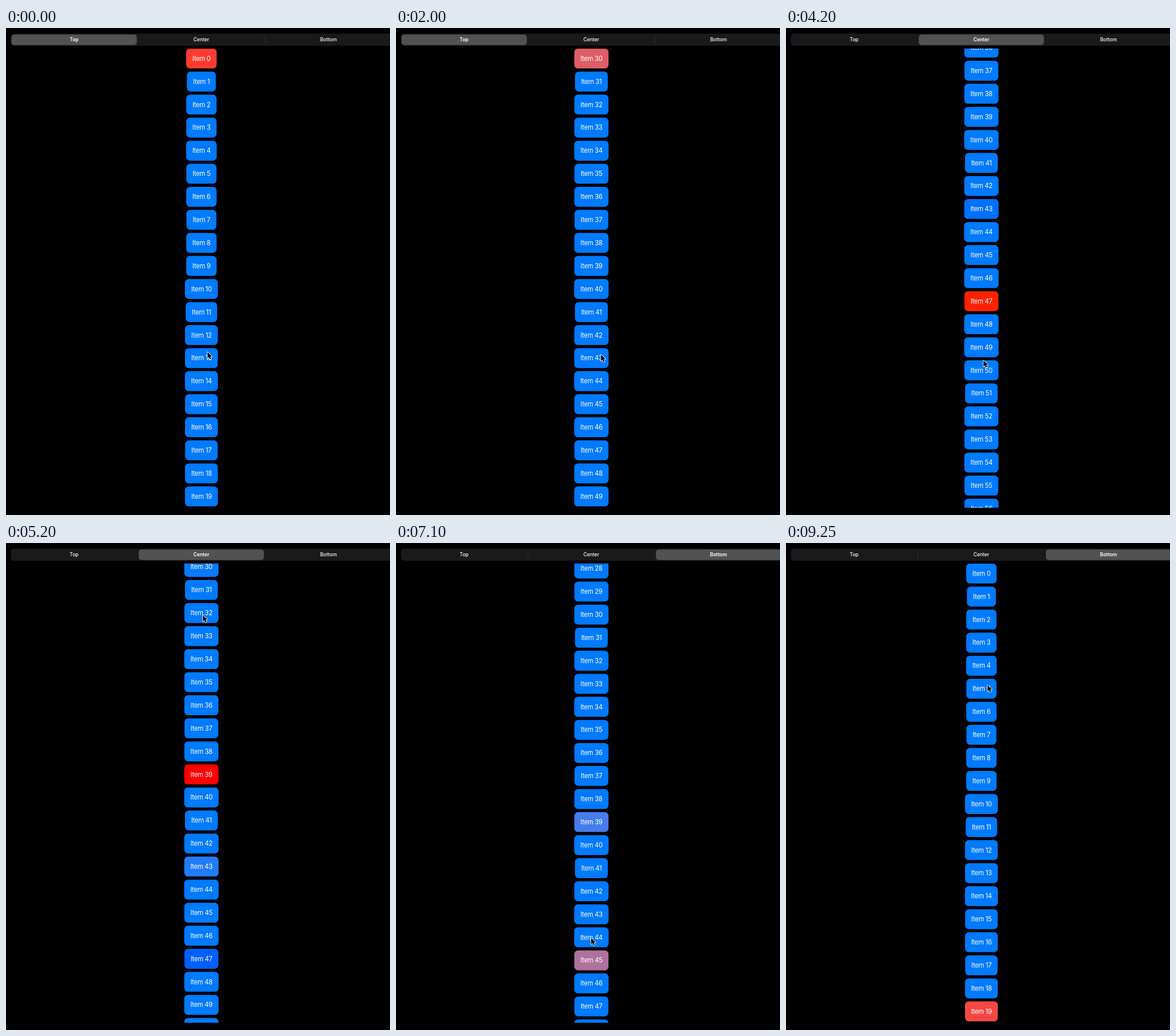
Write an HTML page with a canvas that moves like this. It is 665x843 px and loops after 9300 ms.

```html
<!DOCTYPE html>
<html lang="en">
<head>
<meta charset="utf-8">
<title>Scroll anchors</title>
<style>
html, body { margin: 0; width: 100%; height: 100%; overflow: hidden; background: #000; }
canvas { display: block; width: 665px; height: 843px; }
</style>
</head>
<body>
<canvas id="stage"></canvas>
<script>
const W = 665, H = 843, LOOP = 9300, STEP = 50;
const canvas = document.getElementById('stage');
const ctx = canvas.getContext('2d');
const dpr = window.devicePixelRatio || 1;
canvas.width = W * dpr;
canvas.height = H * dpr;

const FONT = 'Inter, "Open Sans", sans-serif';
const MID_X = 338.4, FIRST_Y = 52.8, PITCH = 39.895, ROW_H = 34.5;
const VIEW_TOP = 35.5, VIEW_BOTTOM = 830.6;
const ANCHOR_Y = { top: FIRST_Y, center: 433, bottom: 813.2 };
const SCROLL_MS = 300, FADE_LEAD = 50;

// Each tap selects an item and scrolls it to the current anchor.
const taps = [
  { t: -9000, item: 0, anchor: 'top' },
  { t: 350, item: 15, anchor: 'top' },
  { t: 1350, item: 30, anchor: 'top' },
  { t: 3192, item: 43, anchor: 'center' },
  { t: 4000, item: 47, anchor: 'center' },
  { t: 4962, item: 39, anchor: 'center' },
  { t: 6978, item: 45, anchor: 'bottom' },
  { t: 7813, item: 33, anchor: 'bottom' },
  { t: 8715, item: 19, anchor: 'bottom' }
];
const segments = ['Top', 'Center', 'Bottom'];
const segmentTaps = [2400, 6200];

// time, x, y of the pointer tip
const pointerPath = [
  [0, 349, 561], [300, 357, 640], [700, 359, 632], [1050, 359, 632], [1350, 358, 638],
  [1900, 357, 638], [2350, 340, 19], [2500, 340, 19], [3050, 342, 582],
  [4150, 342, 582], [4800, 341, 125], [5550, 341, 125], [6150, 557, 19],
  [6300, 557, 19], [6850, 338, 684], [7200, 338, 684], [7720, 353, 328],
  [7950, 353, 322], [8300, 353, 280], [8650, 349, 246], [9300, 349, 246]
];

const clamp = v => Math.min(1, Math.max(0, v));
const ease = v => 0.5 - 0.5 * Math.cos(Math.PI * clamp(v));
const mix = (a, b, k) => a + (b - a) * k;

function spring(ms) {
  if (ms <= 0) return 0;
  const u = ms / 100, z = 0.25, w = Math.sqrt(1 - z * z);
  return 1 - Math.exp(-z * u) * (Math.cos(w * u) + z / w * Math.sin(w * u));
}

// Perceptual blend between the two button colours; may run past either end.
const toLinear = c => (c /= 255) <= 0.04045 ? c / 12.92 : ((c + 0.055) / 1.055) ** 2.4;
const toByte = v => {
  v = clamp(v);
  return Math.round(255 * (v <= 0.0031308 ? 12.92 * v : 1.055 * v ** (1 / 2.4) - 0.055));
};
function toCone(rgb) {
  const [r, g, b] = rgb.map(toLinear);
  return [
    0.41222 * r + 0.53633 * g + 0.05145 * b,
    0.21190 * r + 0.68070 * g + 0.10740 * b,
    0.08830 * r + 0.28172 * g + 0.62998 * b
  ].map(Math.cbrt);
}
const BLUE = toCone([0, 122, 255]), RED = toCone([255, 59, 48]);

function blend(p) {
  const [l, m, s] = BLUE.map((v, i) => mix(v, RED[i], p) ** 3);
  const r = 4.07674 * l - 3.30771 * m + 0.23097 * s;
  const g = -1.26844 * l + 2.60976 * m - 0.34132 * s;
  const b = -0.00420 * l - 0.70342 * m + 1.70761 * s;
  return `rgb(${toByte(r)}, ${toByte(g)}, ${toByte(b)})`;
}

const offsetOf = tap => Math.max(0, FIRST_Y + tap.item * PITCH - ANCHOR_Y[tap.anchor]);

function scrollAt(t) {
  let y = 0;
  for (const tap of taps) y = mix(y, offsetOf(tap), ease((t - tap.t) / SCROLL_MS));
  return y;
}

function highlight(item, t) {
  const i = taps.findIndex(tap => tap.item === item);
  if (i < 0) return 0;
  const next = taps[i + 1];
  return spring(t - taps[i].t) - (next ? spring(t - next.t + FADE_LEAD) : 0);
}

function box(x, y, w, h, r, color) {
  ctx.fillStyle = color;
  ctx.beginPath();
  ctx.roundRect(x, y, w, h, r);
  ctx.fill();
}

function setFont(size, weight, spacing) {
  ctx.font = `${weight} ${size}px ${FONT}`;
  ctx.letterSpacing = spacing + 'px';
}

function label(text, x, y) {
  ctx.fillStyle = '#fff';
  ctx.fillText(text, x - ctx.measureText(text).width / 2, y);
}

function drawList(t) {
  const scroll = scrollAt(t);
  ctx.save();
  ctx.beginPath();
  ctx.rect(0, VIEW_TOP, W, VIEW_BOTTOM - VIEW_TOP);
  ctx.clip();
  setFont(11.2, 400, -0.3);
  for (let i = 0; i < 100; i++) {
    const y = FIRST_Y + i * PITCH - scroll;
    if (y < 0 || y > H + ROW_H) continue;
    const text = 'Item ' + i;
    const w = ctx.measureText(text).width + 21.2;
    box(MID_X - w / 2, y - ROW_H / 2, w, ROW_H, 6.5, blend(highlight(i, t)));
    label(text, MID_X + 0.1, y + 4);
  }
  ctx.restore();
}

function drawSegments(t) {
  const pitch = 220.3;
  const pos = segmentTaps.reduce((sum, at) => sum + ease((t - at) / 250), 0);
  const active = segmentTaps.filter(at => t >= at).length;
  box(8.5, 9.8, 664, 21, 5.5, '#1a1a1c');
  for (const i of [1, 2]) {
    if (active !== i && active !== i - 1) box(7.8 + i * pitch, 14.5, 0.8, 11.5, 0, '#333336');
  }
  box(9.5 + pos * pitch, 11.3, 217, 18.2, 4.8, '#525254');
  segments.forEach((text, i) => {
    setFont(8.6, i === active ? 600 : 500, -0.08);
    label(text, 117.9 + i * pitch, 23.3);
  });
}

function pointerAt(t) {
  const i = Math.max(1, pointerPath.findIndex(p => p[0] >= t));
  const a = pointerPath[i - 1], b = pointerPath[i];
  const k = ease((t - a[0]) / (b[0] - a[0]));
  return [mix(a[1], b[1], k), mix(a[2], b[2], k)];
}

function drawPointer(t) {
  const [x, y] = pointerAt(t);
  ctx.save();
  ctx.translate(x, y);
  ctx.beginPath();
  ctx.moveTo(0, 0);
  ctx.lineTo(0, 10.8);
  ctx.lineTo(2.5, 8.5);
  ctx.lineTo(4.2, 12.5);
  ctx.lineTo(6.2, 11.6);
  ctx.lineTo(4.5, 7.8);
  ctx.lineTo(7.8, 7.6);
  ctx.closePath();
  ctx.lineJoin = 'round';
  ctx.lineWidth = 1.6;
  ctx.strokeStyle = '#fff';
  ctx.stroke();
  ctx.fillStyle = '#000';
  ctx.fill();
  ctx.restore();
}

function draw(t) {
  ctx.setTransform(dpr, 0, 0, dpr, 0, 0);
  ctx.fillStyle = '#000';
  ctx.fillRect(0, 0, W, H);
  drawList(t);
  drawSegments(t);
  drawPointer(t);
}

const start = performance.now();
function frame() {
  const t = (performance.now() - start) % LOOP;
  draw(Math.floor(t / STEP) * STEP);
  requestAnimationFrame(frame);
}
frame();
</script>
</body>
</html>
```
